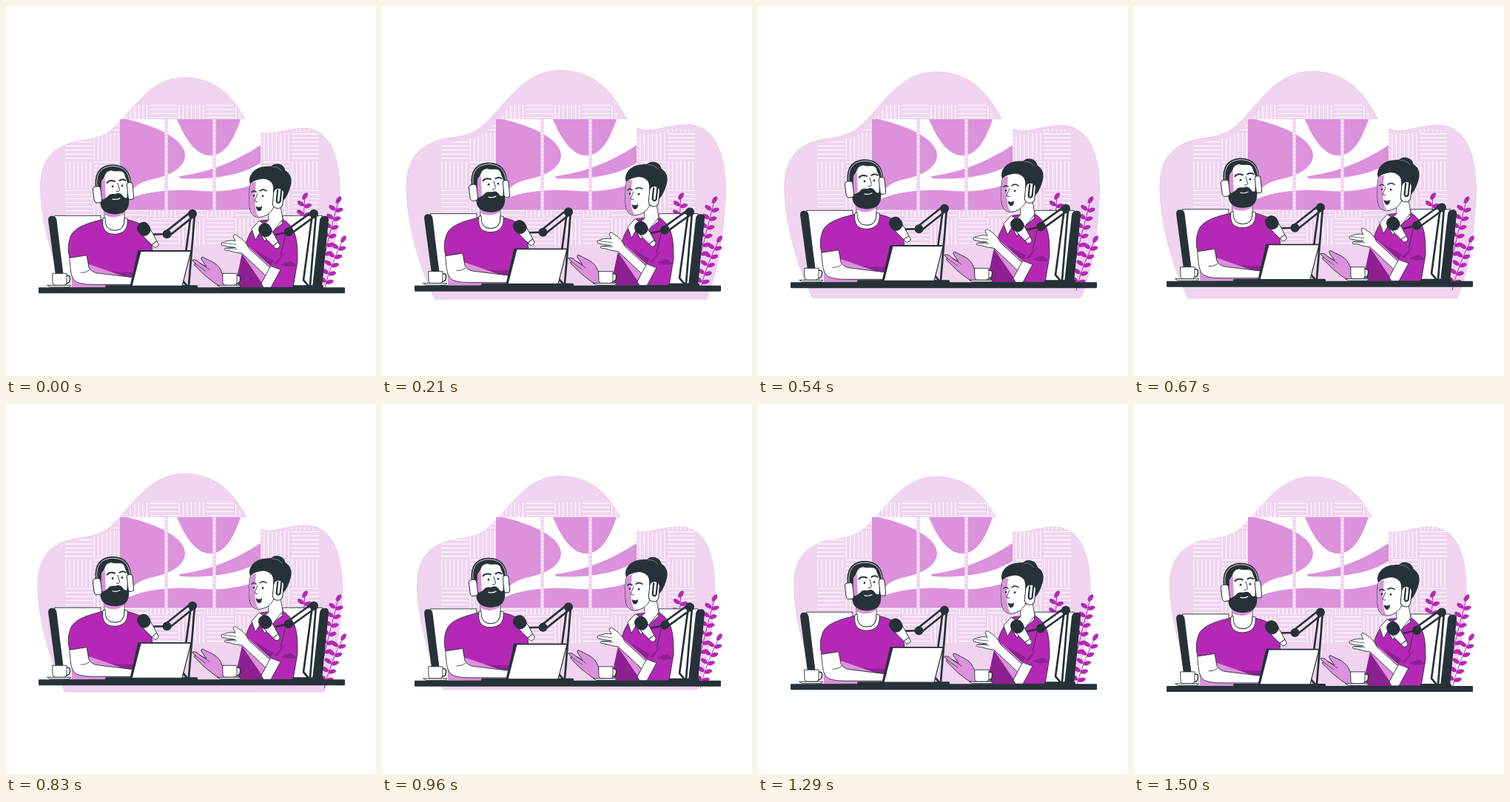
An HTML page with a canvas that plays this animation: 500 by 500 pixels, repeating every 1.54 s.

```html
<!DOCTYPE html>
<html lang="en">
<head>
<meta charset="utf-8">
<title>Podcast</title>
<style>
html, body { margin: 0; width: 100%; height: 100%; overflow: hidden; background: #fff; }
canvas { display: block; width: 100vw; height: 100vh; }
</style>
</head>
<body>
<canvas id="stage"></canvas>
<script>
const canvas = document.getElementById('stage');
const ctx = canvas.getContext('2d');
const LOOP = 1540, STEPS = 37;
const INK = '#263238', WHITE = '#fff', PALE = '#f0d4ef', LILAC = '#db91db';
const PURPLE = '#b528b5', DEEP = '#8d2191';

function shape(d, fill, stroke, width = 0.9) {
  const path = new Path2D(d);
  if (fill) { ctx.fillStyle = fill; ctx.fill(path); }
  if (stroke) { ctx.strokeStyle = stroke; ctx.lineWidth = width; ctx.stroke(path); }
}
const line = (d, width = 1, color = INK) => shape(d, null, color, width);
function dot(x, y, r, fill = INK, ry = r, turn = 0) {
  ctx.beginPath();
  ctx.ellipse(x, y, r, ry, turn, 0, Math.PI * 2);
  ctx.fillStyle = fill;
  ctx.fill();
}
function pill(x, y, w, h, r, fill, stroke, width = 1) {
  ctx.beginPath();
  ctx.roundRect(x, y, w, h, r);
  if (fill) { ctx.fillStyle = fill; ctx.fill(); }
  if (stroke) { ctx.strokeStyle = stroke; ctx.lineWidth = width; ctx.stroke(); }
}
function at(x, y, turn, draw) {
  ctx.save();
  ctx.translate(x, y);
  ctx.rotate(turn);
  draw();
  ctx.restore();
}

const BLOB = 'M84 385C63 342 48 285 48.5 243C49 211 63 189 101 183C137 179 143 169 158 154' +
  'C186 121 206 98 242 98C288 99 308 129 321 152C331 172 344 175 362 172C395 165 411 162 427 176' +
  'C443 190 449 219 449 249C447 302 440 349 425 385Z';

function blob(scale) {
  ctx.save();
  ctx.translate(248.75, 241.5);
  ctx.scale(scale, scale);
  ctx.translate(-248.75, -241.5);
  shape(BLOB, PALE, '#dcb4dc', 0.5);
  ctx.restore();
}

function wallPanels() {
  ctx.save();
  ctx.clip(new Path2D(BLOB));
  const size = 38.3;
  for (let row = 0; row < 5; row++) for (let col = 0; col < 9; col++) {
    const x = 80 + col * size, y = 133.5 + row * size;
    for (let i = 0; i < 7; i++) {
      const k = 0.8 + i * 5.5;
      line((row + col) % 2 ? `M${x} ${y + k}h36.5` : `M${x + k} ${y}v36.5`, 1.1, WHITE);
    }
  }
  ctx.restore();
}

function windowPane() {
  ctx.fillStyle = WHITE;
  ctx.fillRect(154, 153, 190, 122.5);
  shape('M154 153H163C207 163 242 181 242 202C241 221 218 230 194 235C178 239 168 248 163 262' +
    'C192 249 229 247 264 250C299 252 323 246 344 238V275.5H154Z', LILAC);
  shape('M231 153H317C308 180 296 202 276 202C256 202 242 179 231 153Z', LILAC);
  shape('M234.5 230C278 224 310 210 344 188V212C316 231 270 235 236 233Q233 231 234.5 230Z', LILAC);
  for (const x of [216.5, 281.5]) {
    line(`M${x} 153V275.5`, 4.6, PALE);
    ctx.setLineDash([1.2, 4.2]);
    line(`M${x} 155V275`, 2.6, '#faf0fa');
    ctx.setLineDash([]);
  }
}

function sprig(x0, y0, x1, y1, bend, pairs) {
  const cx = (x0 + x1) / 2 + bend, cy = (y0 + y1) / 2;
  line(`M${x0} ${y0}Q${cx} ${cy} ${x1} ${y1}`, 1, PURPLE);
  const along = (a, b, c, u) => (1 - u) * (1 - u) * a + 2 * u * (1 - u) * b + u * u * c;
  for (let i = 0; i < pairs; i++) {
    const u = 0.14 + 0.82 * i / pairs;
    const x = along(x0, cx, x1, u), y = along(y0, cy, y1, u);
    dot(x - 4.5, y - 4.5, 5.3, PURPLE, 2.9, 0.6);
    dot(x + 5, y - 1.5, 5.3, PURPLE, 2.9, -0.3);
  }
  dot(x1, y1, 2.9, PURPLE, 5.5, 0.6);
}

function plant() {
  sprig(401, 316, 404, 257, -1, 4);
  sprig(428, 348, 449.5, 262, -1, 6);
  sprig(430, 384, 456, 315, -5, 5);
}

function chairs() {
  shape('M66 284H128V381H80Z', WHITE, INK);
  shape('M57 290Q57 284.5 62 284.5Q67.5 284.5 68.5 290L77.5 365H67Z', INK);
  shape('M427 284H374V381H416Z', WHITE, INK);
  shape('M424 290Q425 284.5 431 284.5Q436.5 284.5 436 290L427 381H414Z', INK);
}

function manHead() {
  shape('M121 247C118 225 128 214.8 145 214.8C160 215 170 225 169 244L164 262L130 264Z', INK);
  line('M123 244C121 225 130 217.5 145 217C158 217.5 166 224 167.5 239', 0.8, WHITE);
  shape('M129 263L130 236C135 232 132 225 142 223C150 226 157 221 160 228C161 233 164 236 164.5 242' +
    'L163 266H131Z', WHITE);
  shape('M128 263L129 237Q134 235 133.5 229L135 264Z', LILAC);
  shape('M127.5 261C131 264 136 260 140 255.5C144 253.5 147 255.5 150 254C154 253 157 255 159 259' +
    'Q163 262 166 257C167 268 166 276 158 280C150 283 139 283 133 278C128 274 127 268 127.5 261Z', INK);
  line('M144 261.5Q149 263 154 260.5', 1.2, WHITE);
  line('M136.5 239.5Q140 235 147 237.5M153.5 236.5Q158 233.5 161.5 236.5', 2);
  dot(144, 244.5, 1.4);
  dot(157, 243.5, 1.4);
  line('M151 240L153.5 249Q153 252 149 251.5', 0.9);
  at(123.5, 255.5, -0.12, () => pill(-5.2, -11, 10.4, 22, 4, WHITE, INK));
  at(168, 250.5, -0.1, () => pill(-3.8, -11.5, 7.6, 23, 3, WHITE, INK));
}

function man() {
  shape('M131 289C110 294 91 300 87 313C83 324 84 333 86 341L108 338L112 381H198L198 335' +
    'C197 319 194 303 181 295Q172 291 163 289Z', PURPLE, INK);
  shape('M108 338L109 346C126 360 146 363 200 359V381H112Z', DEEP);
  shape('M88 350H113L176 372V381H89Z', LILAC);
  shape('M86 341L109 337.5L112 354Q115 360 123 361.5L176 368V377H118Q97 377 92 371Q88 366 87 355Z', WHITE, INK);
  line('M101 361Q107 362 113 357.5', 0.8);
  shape('M133 273V289Q134 304 147 304Q160 304 160 289V273Z', WHITE, INK, 0.8);
  shape('M133 274H160V281Q147 290 133 283Z', LILAC);
  shape('M131 288Q128 309 147 309Q166 308 164 288L160 287Q161 304 147 304Q133 304 134 287Z', WHITE, INK);
  manHead();
}

function womanHead() {
  shape('M354 276L355 290L344 300L358 309L374 289L370 266Z', WHITE, INK, 0.8);
  shape('M331 238C328 249 329 260 329 269C329 281 335 287 343 286C351 285 357 281 361 274L369 254L357 231Z',
    WHITE, INK, 0.9);
  shape('M332 239C329 250 329 264 329.5 270C330 280 336 286 342 286C336 279 337 268 336 259L338 238Z', LILAC);
  dot(367, 222.5, 10.5, INK, 8.5, 0.25);
  shape('M330 241C326 231 335 218 351 217.5C363 216 373 219 379 224C387 230 387 239 383 249' +
    'C380 258 374 268 364 271L361 252C362 243 360 238 352 235C344 233 337 235 330 241Z', INK);
  line('M360 218Q368 217 373 224', 0.7, '#fff8');
  line('M332 252Q335 249 338 252M343 250.5Q347 247 352 250.5', 1.5);
  dot(335, 257, 1.3);
  dot(347, 257.5, 1.4);
  line('M340 254Q337 261 336 264Q338 266 340 265', 0.9);
  shape('M337.5 271Q342 274 346 271Q346 278 341.5 278Q338.5 277 337.5 271Z', INK);
  at(368, 260.5, 0.1, () => {
    pill(-7, -13.5, 13.5, 27, 6, WHITE, INK);
    line('M-2 -11V4Q0 8 3 4V-12', 2.2);
  });
}

function woman() {
  shape('M344 291C334 300 328 309 325 320L311 381H388L394 345C394 318 393 300 373 288Z', PURPLE, INK);
  shape('M320 330L309 381H347L356 358L333 337Z', DEEP);
  shape('M361 350L378 332L367 349ZM371 350L385 345L394 352L380 353Z', DEEP);
  shape('M336 330L362 345L356 353Z', DEEP);
  line('M378 307Q374 326 371 337', 0.8);
  shape('M342 291L332 302L337 317L343 307L350 319L355 310L374 294L371 287L356 300Z', WHITE, INK);
  line('M343 307L347 296', 0.8);

  shape('M252 344Q257 342 262 348L271 353L264 343Q263 338 268 341L280 347Q289 352 292 362' +
    'L316 372L313 381H294C284 378 277 371 269 365L257 353Q252 349 256 349Z', LILAC, INK, 0.9);
  line('M256 349L270 359M262 348L275 357', 0.7);

  shape('M317 333L328 326L363 357L353 379L345 374Z', LILAC);
  shape('M291 321Q301 316 310 318L307 312Q308 307 314 312Q324 318 328 328L361 358L353 367' +
    'L319 335Q309 334 301 331Q293 331 296 328L310 327Q299 326 292 324Z', WHITE, INK, 0.9);
  line('M294 321L311 323M298 328L312 329', 0.7);
  shape('M358 352L371 357L358 381H348L345 376Z', WHITE, INK);
  womanHead();
}

function cup(x) {
  shape(`M${x + 17} 365h4q3 0 2.5 5q0 6-7 6`, WHITE, INK, 1.5);
  shape(`M${x} 362h19v12q0 4-4 4h-11q-4 0-4-4z`, WHITE, INK);
  shape(`M${x - 7} 378h32l-3 2.5h-25z`, WHITE, INK);
}

// Boom arm: mic head, elbow and shoulder joints, then post and base.
function boom(hx, hy, ex, ey, sx, sy, base) {
  line(`M${sx - 2} ${sy}L${sx - 14} 371L${sx - 8} 378M${sx + 3} ${sy}L${sx - 5} 378`, 2.7);
  line(`M${ex - 2} ${ey - 3}L${sx - 2} ${sy - 3}M${ex + 2} ${ey + 3}L${sx + 2} ${sy + 3}`, 2.6);
  line(`M${hx + 9} ${hy + 8}L${ex} ${ey}`, 2.5);
  dot(sx, sy, 6);
  dot(ex, ey, 6);
  pill(base, 378, 42, 4, 1.5, INK);
  at(hx, hy, 0.93, () => {
    shape('M6 -6.5L13 -6L29 -3.5Q32 0 29 3.5L13 6L6 6.5Z', WHITE, INK);
    line('M24 -4V4', 1);
    pill(-9, -8.5, 19, 17, 8, INK);
  });
}

function laptop() {
  pill(134, 378, 108, 4, 1.5, INK);
  shape('M179 331.5H249L237 380H168Z', INK, INK, 1.5);
  shape('M182 332H250L238 379H170Z', WHITE, INK, 1.2);
}

function studio() {
  chairs();
  man();
  woman();
  boom(186, 301.5, 217.5, 309, 252, 281.5, 217);
  laptop();
  boom(350, 303, 382, 306, 416, 281.5, 387);
  cup(63);
  cup(293);
  pill(44, 381, 414, 8, 1, INK);
}

// Double heartbeat: each rise and fall is steepest near its peak.
function beat(t) {
  const rise = (a, b) => Math.pow((t - a) / (b - a), 1.3);
  if (t < 225) return rise(0, 225);
  if (t < 445) return rise(445, 225);
  if (t < 625) return rise(445, 625);
  return t < 1045 ? rise(1045, 625) : 0;
}

function frame(now) {
  const ratio = window.devicePixelRatio || 1;
  const w = Math.round(innerWidth * ratio), h = Math.round(innerHeight * ratio);
  if (canvas.width !== w || canvas.height !== h) { canvas.width = w; canvas.height = h; }
  ctx.setTransform(w / 500, 0, 0, h / 500, 0, 0);
  ctx.fillStyle = WHITE;
  ctx.fillRect(0, 0, 500, 500);
  ctx.lineJoin = ctx.lineCap = 'round';

  const step = Math.floor((now % LOOP) * STEPS / LOOP + 0.1);
  const t = (step + 1) % STEPS * LOOP / STEPS;
  const lift = 10 * (1 - Math.abs(2 * t / LOOP - 1));

  blob(1 + 0.09 * beat(t));
  ctx.lineCap = 'butt';
  wallPanels();
  windowPane();
  ctx.lineCap = 'round';
  plant();
  ctx.save();
  ctx.translate(0, -0.1 - lift);
  studio();
  ctx.restore();
  requestAnimationFrame(frame);
}
requestAnimationFrame(frame);
</script>
</body>
</html>
```
